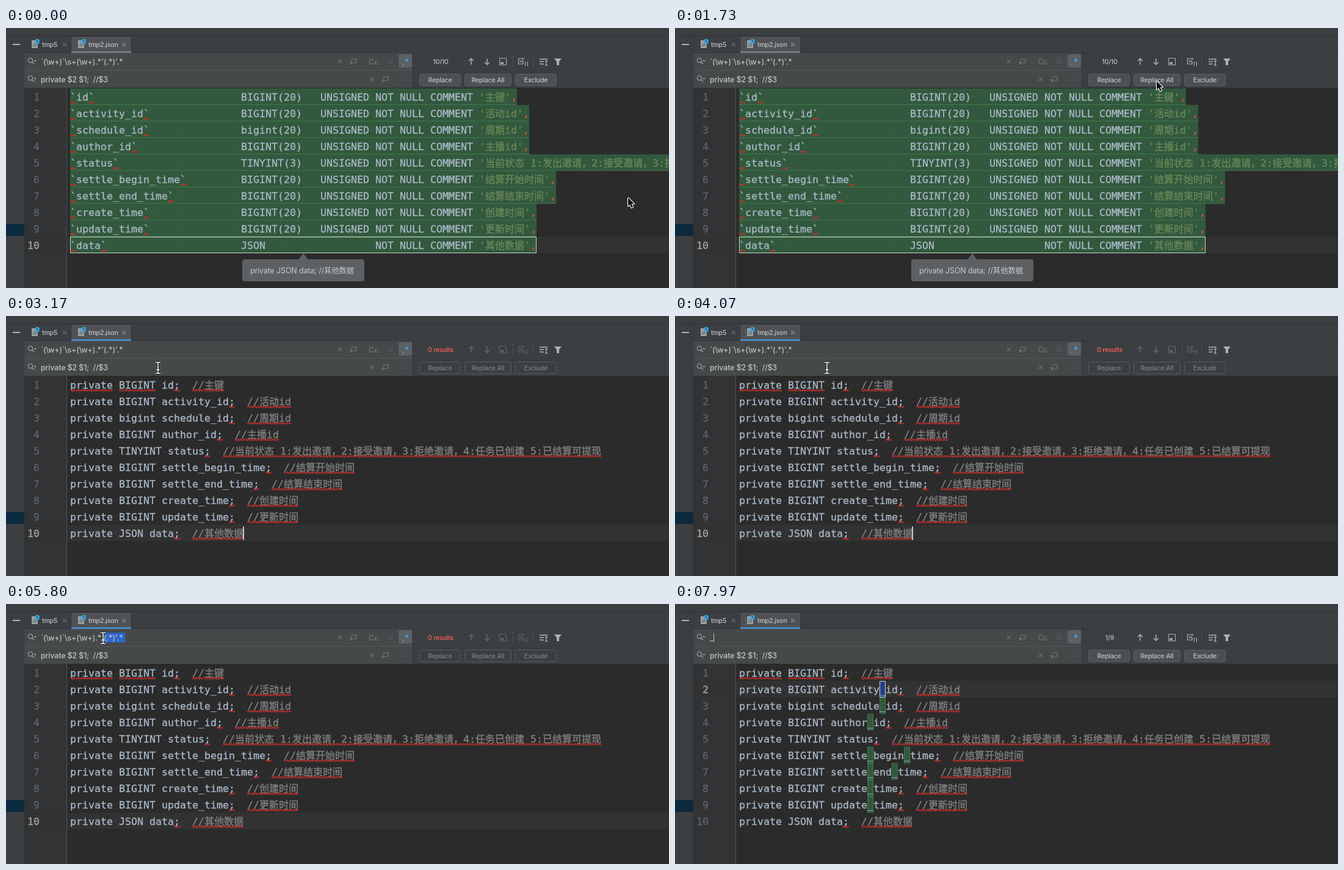
An HTML page with a canvas that plays this animation: 1086x426 px, repeating every 8 s.

```html
<!DOCTYPE html>
<html lang="zh">
<head>
<meta charset="utf-8">
<style>
html, body { margin: 0; width: 100%; height: 100%; overflow: hidden; background: #2b2b2b; }
canvas { display: block; }
</style>
</head>
<body>
<canvas id="stage" width="1086" height="426"></canvas>
<script>
const ctx = document.getElementById('stage').getContext('2d');
const LOOP = 8000, LEFT = 105, TOP = 99, ROW = 27, CH = 10, CJK = 16;
const T = { replaced: 2250, recount: 2430, lint: 2560, focus: 5600, selected: 6200, hide: 6400, typed: 7700 };
const CODE = '16.61px "DejaVu Sans Mono", monospace';
const HAN = '16px "Noto Sans CJK SC", "Noto Sans CJK", sans-serif';
const UI = 'Inter, "Noto Sans CJK SC", "Noto Sans CJK", sans-serif';
const RED = '#d0302c', GREEN = '#32593d', ICON = '#afb1b3', DIM = '#65686a';
const PATTERN = "`(\\w+)`\\s+(\\w+).*'(.*)'.*";

const columns = [
  ['id', 'BIGINT(20)', '主键'],
  ['activity_id', 'BIGINT(20)', '活动id'],
  ['schedule_id', 'bigint(20)', '周期id'],
  ['author_id', 'BIGINT(20)', '主播id'],
  ['status', 'TINYINT(3)', '当前状态 1:发出邀请，2:接受邀请，3:拒绝邀请，4:任务已创建 5:已结算可提现'],
  ['settle_begin_time', 'BIGINT(20)', '结算开始时间'],
  ['settle_end_time', 'BIGINT(20)', '结算结束时间'],
  ['create_time', 'BIGINT(20)', '创建时间'],
  ['update_time', 'BIGINT(20)', '更新时间'],
  ['data', 'JSON', '其他数据']
];

// Pointer stops: time, x, y
const path = [
  [700, 1019, 278], [1500, 789, 87], [2550, 789, 87], [3050, 249, 85], [4600, 249, 85],
  [5000, 211, 66], [5300, 211, 66], [5600, 195, 56], [6200, 57, 56]
];

function pointerAt(t) {
  const next = path.findIndex(p => p[0] > t);
  if (next < 1) return path[next ? path.length - 1 : 0].slice(1);
  const [t0, x0, y0] = path[next - 1], [t1, x1, y1] = path[next];
  const u = (t - t0) / (t1 - t0), e = u * u * (3 - 2 * u);
  return [x0 + (x1 - x0) * e, y0 + (y1 - y0) * e];
}

function box(x, y, w, h, fill, stroke, radius = 0) {
  ctx.beginPath();
  if (stroke) ctx.roundRect(x + .5, y + .5, w - 1, h - 1, radius);
  else ctx.roundRect(x, y, w, h, radius);
  if (fill) { ctx.fillStyle = fill; ctx.fill(); }
  if (stroke) { ctx.strokeStyle = stroke; ctx.lineWidth = 1; ctx.stroke(); }
}

// Each argument after the width is one polyline of x, y pairs
function lines(color, width, ...polylines) {
  ctx.beginPath();
  for (const p of polylines)
    for (let i = 0; i < p.length; i += 2) ctx[i ? 'lineTo' : 'moveTo'](p[i], p[i + 1]);
  ctx.strokeStyle = color;
  ctx.lineWidth = width;
  ctx.stroke();
}

function polygon(fill, ...p) {
  ctx.beginPath();
  for (let i = 0; i < p.length; i += 2) ctx.lineTo(p[i], p[i + 1]);
  ctx.closePath();
  ctx.fillStyle = fill;
  ctx.fill();
}

function label(text, x, y, color, size = 10.6, align = 'left', spacing = -.2, weight = 500) {
  ctx.font = `${weight} ${size}px ${UI}`;
  ctx.letterSpacing = spacing + 'px';
  ctx.textAlign = align;
  ctx.fillStyle = color;
  ctx.fillText(text, x, y);
  ctx.textAlign = 'left';
  ctx.letterSpacing = '0px';
}

const fieldText = (text, y, color = '#c3c5c7') => label(text, 57, y, color, 12.4, 'left', -.1);
const isHan = c => c > '\u00ff';
const widthOf = text => [...text].reduce((w, c) => w + (isHan(c) ? CJK : CH), 0);

// Draws mixed code text, slightly emboldened, and returns its right edge
function code(text, x, row, color, dots = '#505254') {
  const y = TOP + row * ROW;
  for (const [run] of text.matchAll(/[^\x00-\xff]+|[\x00-\xff]+/g)) {
    ctx.font = isHan(run) ? HAN : CODE;
    ctx.fillStyle = ctx.strokeStyle = color;
    ctx.lineWidth = .35;
    ctx.fillText(run, x, y + 20);
    ctx.strokeText(run, x, y + 20);
    ctx.fillStyle = dots;
    [...run].forEach((c, i) => { if (c === ' ') ctx.fillRect(x + i * CH + 4.5, y + 14, 1.3, 1.3); });
    x += widthOf(run);
  }
  return x;
}

function squiggle(x, row, width) {
  const y = TOP + row * ROW + 21.5, p = [];
  for (let i = 0; i <= width; i += 2) p.push(x + i, y + (i % 4 ? 0 : 2.8));
  lines(RED, 1.1, p);
}

function cross(x, y, color = '#6c6f71') {
  lines(color, 1.1, [x - 3, y - 3, x + 3, y + 3], [x + 3, y - 3, x - 3, y + 3]);
}

function tab(x, name) {
  box(x, 20, 10, 13, '#9aa0a4', null, 1);
  lines('#4d5255', 1, [x + 2, 26.5, x + 8, 26.5], [x + 2, 29.5, x + 8, 29.5]);
  ctx.beginPath();
  ctx.arc(x + 9, 22, 4, 0, 7);
  ctx.fillStyle = '#3ea5d6';
  ctx.fill();
  lines('#29485a', 1, [x + 9, 19.5, x + 9, 22.5, x + 11, 22.5]);
  label(name, x + 17, 31, '#c0c2c4');
}

function searchIcon(y) {
  ctx.beginPath();
  ctx.arc(40, y - 1, 3.6, 0, 7);
  ctx.strokeStyle = '#9da0a2';
  ctx.lineWidth = 1.2;
  ctx.stroke();
  lines('#9da0a2', 1.4, [42.5, y + 1.5, 46, y + 5]);
  polygon('#9da0a2', 45, y - 1, 50, y - 1, 47.5, y + 1.5);
}

function newline(x, y) {
  lines('#77797b', 1.2, [x - 4, y - 4, x + 5, y - 4, x + 5, y + 2, x - 5, y + 2], [x - 2, y - 1, x - 5, y + 2, x - 2, y + 5]);
}

function arrow(x, dir, color) {
  lines(color, 1.5, [x, 55 + 5 * dir, x, 55 - 5 * dir], [x - 4, 55 + dir, x, 55 + 5 * dir, x + 4, 55 + dir]);
}

function chrome(t) {
  box(0, 0, 1086, 98, '#3c3f41');
  box(0, 12, 1086, 1, '#2f3133');
  box(30, 40, 1056, 1, '#323436');
  box(106, 13, 100, 28, '#4e5254', '#323436');
  box(107, 38, 98, 3, t < T.replaced ? '#747a80' : '#4a88c7');
  tab(42, 'tmp5');
  tab(118, 'tmp2.json');
  cross(96, 27);
  cross(193, 27, '#85888a');

  box(0, 41, 30, 385, '#3c3f41');
  box(16, 140, 1, 168, '#44474a');
  box(11, 26, 12, 2, '#b4b6b8');
  box(29, 13, 1, 413, '#36393b');
  box(0, 321, 30, 20, '#0d293e');

  box(30, 41, 636, 57, '#45494a');
  box(30, 69, 636, 1, '#55585a');
  box(666, 41, 1, 57, '#35383a');
}

function findBar(t) {
  const before = t < T.replaced, typed = t >= T.typed;
  const empty = t >= T.recount && !typed;
  searchIcon(54);
  searchIcon(83);
  if (typed) {
    fieldText('_', 60);
    box(63, 48, 1, 14, '#c3c5c7');
  } else {
    if (t >= T.focus) {
      const start = t < T.selected ? pointerAt(t)[0] : 57;
      box(start, 47, 195 - start, 16, '#2f65ca');
    }
    fieldText(PATTERN, 60);
  }
  fieldText('private $2 $1;  //$3', 89);
  cross(547, 55);
  newline(569, 55);
  label('Cc', 594, 60, '#6a6d6f', 12.5, 'left', 0, 600);
  label('W', 629, 59, '#56595b', 10, 'center');
  box(643, 43, 22, 22, '#5b6064', null, 3);
  label('.*', 654, 61, '#46a9e0', 14, 'center', 0, 700);
  cross(599, 84);
  newline(621, 84);
  label('Aa', 654, 88, '#515456', 9, 'center');

  label(typed ? '1/9' : empty ? '0 results' : '10/10', 712, 59, empty ? '#ff5f57' : '#bbbdbf', 10.6, 'center');
  const nav = before || typed ? ICON : DIM, tool = empty ? DIM : ICON;
  arrow(762, -1, nav);
  arrow(788, 1, nav);
  box(808, 49, 12, 12, null, tool);
  box(810, 56, 5, 3, tool);
  box(830, 46, 1, 18, '#4d5052');
  lines(tool, 1.2, [847, 50, 839.5, 50, 839.5, 59, 847, 59, 847, 55], [842, 53, 844, 56, 849, 49],
    [850.5, 55, 850.5, 62], [854.5, 55, 854.5, 62]);
  box(863, 46, 1, 18, '#4d5052');
  lines(ICON, 1.4, [874, 51, 887, 51], [874, 55, 881, 55], [874, 59, 881, 59], [885, 54, 885, 61],
    [883, 54, 887, 54], [883, 61, 887, 61]);
  polygon(ICON, 898, 50, 910, 50, 906, 55, 906, 61, 902, 61, 902, 55);

  for (const [x, w, name] of [[677, 68, 'Replace'], [751, 77, 'Replace All'], [834, 68, 'Exclude']]) {
    box(x, 75, w, 20, empty ? '#3c3f41' : '#4c5052', empty ? '#5a5d5f' : '#5e6163', 3);
    label(name, x + w / 2, 89, empty ? '#7d7f81' : '#c0c2c4', 10.6, 'center');
  }
}

function sqlRow([name, type, note], row) {
  const y = TOP + row * ROW, last = row === 9, text = '#a9b7c6', dots = '#4a6b52';
  const noteX = LEFT + 67 * CH, quoted = `'${note}'`, width = noteX + widthOf(quoted) + CH - LEFT;
  box(LEFT, y, width, ROW, GREEN, last ? '#d0d4d0' : null);
  if (!last) box(LEFT, y + ROW - 1, width, 1, '#44764f');
  const field = '`' + name + '`';
  code(field.padEnd(28) + type.padEnd(13) + (last ? '' : 'UNSIGNED').padEnd(9) + 'NOT NULL COMMENT ', LEFT, row, text, dots);
  const end = code(quoted, noteX, row, '#6a8759', dots);
  code(',', end, row, '#d9553f');
  squiggle(LEFT, row, CH);
  squiggle(LEFT + (field.length - 1) * CH, row, CH);
}

function javaRow([name, type, note], row, t) {
  const head = `private ${type.split('(')[0]} `;
  const nameX = LEFT + head.length * CH, y = TOP + row * ROW;
  if (t >= T.typed) {
    [...name].forEach((c, i) => {
      if (c !== '_') return;
      const first = row === 1;
      box(nameX + i * CH, y, CH, ROW, first ? '#214283' : GREEN, first ? '#d0d4d0' : '#44764f');
    });
  }
  const end = code(`${head}${name};  `, LEFT, row, '#a9b7c6');
  const comment = '//' + note;
  const right = code(comment, end, row, '#808080');
  squiggle(end - 3 * CH, row, CH);
  if (t >= T.lint) {
    squiggle(end, row, right - end);
    if (row === 0) { squiggle(LEFT, 0, 70); squiggle(LEFT + 80, 0, 60); }
  }
  if (row === 9 && t < T.focus) box(right - 1, y + 3, 2, 22, '#c8c8c8');
}

function editor(t) {
  const current = t < T.typed ? 9 : 1, y = TOP + current * ROW;
  box(30, 98, 1056, 328, '#2b2b2b');
  box(30, 98, 69, 328, '#313335');
  box(30, y, 1056, ROW, '#323232');
  box(99, 98, 1, 328, '#505254');
  columns.forEach((column, row) => {
    const n = String(row + 1);
    code(n, 55 - n.length * CH, row, row === current ? '#a4a3a3' : '#606366');
    if (t < T.replaced) sqlRow(column, row);
    else javaRow(column, row, t);
  });
  if (t < T.recount) {
    polygon('#5e6163', 479, 380, 487, 369, 495, 380);
    box(387, 379, 200, 36, '#5e6163', null, 4);
    label('private JSON data; //其他数据', 400, 402, '#c8cacb', 12.4, 'left', -.1, 400);
  }
}

function pointer(t) {
  if (t >= T.hide) return;
  const [x, y] = pointerAt(t);
  ctx.save();
  ctx.translate(x, y);
  ctx.lineJoin = 'round';
  if (x < 540 && (Math.abs(y - 55) < 9 || Math.abs(y - 84) < 12)) {
    const beam = [[-4, -9, -1, -9, 0, -8, 1, -9, 4, -9], [0, -8, 0, 8], [-4, 9, -1, 9, 0, 8, 1, 9, 4, 9], [-2.5, 3, 2.5, 3]];
    lines('#111', 3.4, ...beam);
    lines('#fff', 1.6, ...beam);
  } else {
    const shape = [0, 0, 0, 14, 3.2, 11, 5.6, 16.5, 8, 15.4, 5.7, 10.2, 10, 10];
    lines('#fff', 2.2, [...shape, 0, 0]);
    polygon('#111', ...shape);
  }
  ctx.restore();
}

function frame() {
  const t = performance.now() % LOOP;
  chrome(t);
  findBar(t);
  editor(t);
  pointer(t);
  requestAnimationFrame(frame);
}
frame();
</script>
</body>
</html>
```
